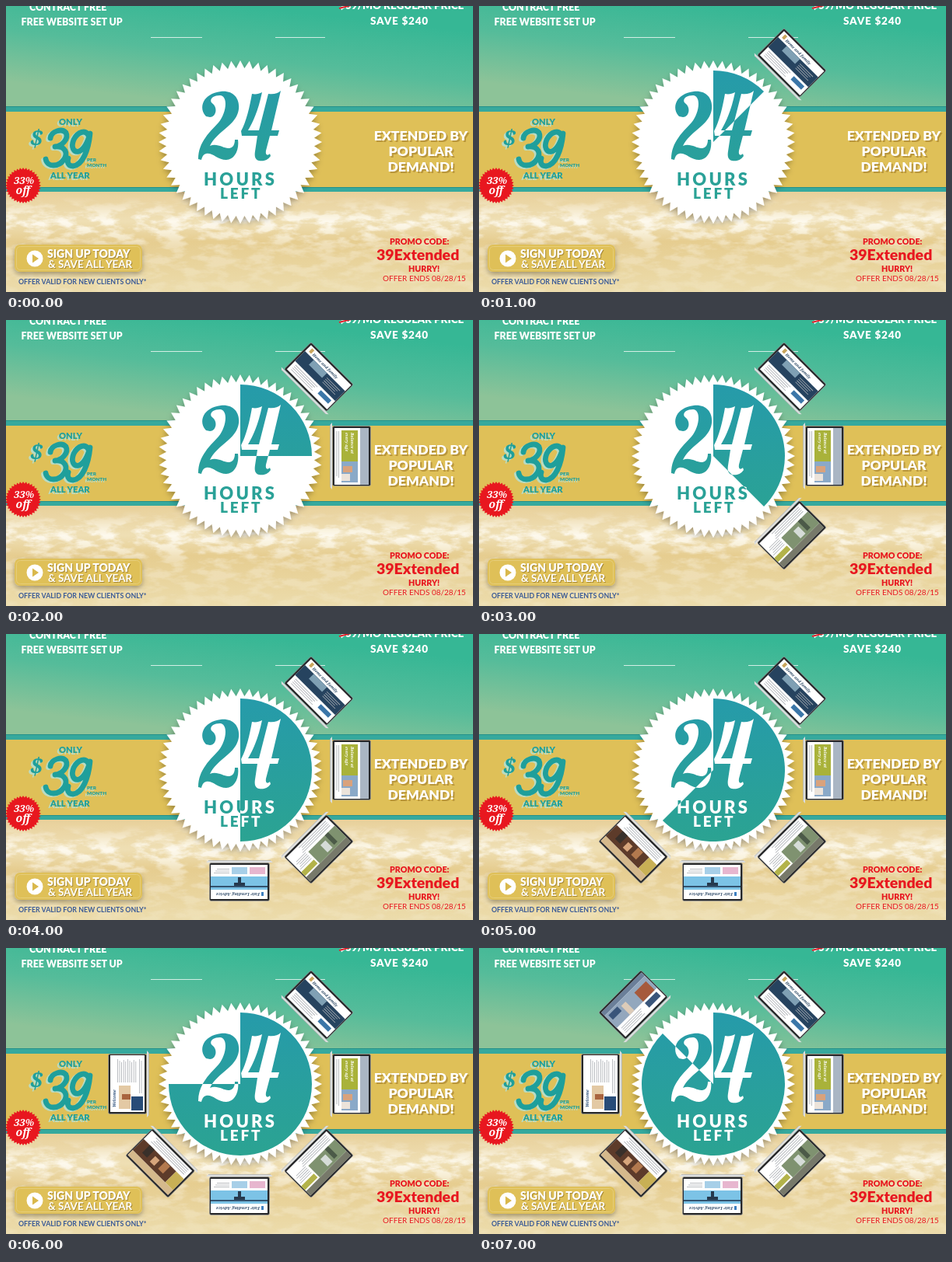
Write an HTML page that moves like this. It is 600 px wide and 368 px high and loops after 8 s.

```html
<!DOCTYPE html>
<html lang="en">
<head>
<meta charset="utf-8">
<title>24 hours left</title>
<style>
html, body { margin: 0; width: 100%; height: 100%; overflow: hidden; }
svg { display: block; width: 600px; height: 368px; }
text { font-family: Lato, "Open Sans", sans-serif; font-weight: 900; stroke: none; }
.bold { font-weight: 700; }
.plain { font-weight: 400; }
.script { font-family: "Noto Serif", serif; font-style: italic; font-weight: 700; }
.mid { text-anchor: middle; }
.strokes path { fill: none; stroke-width: 6.8; stroke-linecap: round; stroke-linejoin: round; }
</style>
</head>
<body>
<svg viewBox="0 0 600 368">
  <defs>
    <linearGradient id="sea" gradientUnits="userSpaceOnUse" x1="308" y1="0" x2="293" y2="131">
      <stop stop-color="#36b795"/><stop offset=".5" stop-color="#55bc9a"/><stop offset="1" stop-color="#8dc398"/>
    </linearGradient>
    <linearGradient id="sand" x2="0" y2="1">
      <stop stop-color="#e8d09a"/><stop offset=".3" stop-color="#efdfb4"/>
      <stop offset=".5" stop-color="#e6cd90"/><stop offset="1" stop-color="#ecdcac"/>
    </linearGradient>
    <linearGradient id="teal" gradientUnits="userSpaceOnUse" x1="0" y1="90" x2="0" y2="265">
      <stop stop-color="#269ba9"/><stop offset="1" stop-color="#2ba392"/>
    </linearGradient>
    <linearGradient id="fade" x2="0" y2="1">
      <stop offset=".05" stop-color="#000"/><stop offset=".3" stop-color="#ddd"/>
      <stop offset=".55" stop-color="#555"/><stop offset="1" stop-color="#222"/>
    </linearGradient>
    <mask id="shore"><rect y="239" width="600" height="129" fill="url(#fade)"/></mask>
    <filter id="foam" x="0" y="0" width="1" height="1">
      <feTurbulence type="fractalNoise" baseFrequency=".035 .09" numOctaves="5" seed="8"/>
      <feColorMatrix values="0 0 0 0 1  0 0 0 0 .98  0 0 0 0 .92  4 0 0 0 -1.6"/>
    </filter>
    <filter id="shadow" x="-20%" y="-20%" width="140%" height="140%">
      <feDropShadow dx="0" dy="3" stdDeviation="3" flood-opacity=".3"/>
    </filter>
    <clipPath id="wedge"><path id="slice"/></clipPath>

    <g id="label">
      <path d="M257 142C247 132 252 113 276 110C297 108 303 126 297 140C291 155 270 163 262 180C272 176 280 184 287 183C292 182 294 178 294 172L298 172C300 186 293 198 283 198C272 198 265 188 257 190C253 191 252 195 251 198L247 197C247 175 262 162 273 150C283 138 286 116 275 115C264 115 260 122 266 126C272 131 270 143 262 143Z"/>
      <path d="M329 111C324 135 317 150 311 160L325 160L337 113C343 114 349 113 353 109L341 160L351 160L349 167L339 167L334 186C333 192 336 193 339 190L340 193C336 199 330 200 325 199C320 198 319 193 320 187L323 167L303 167L302 161C309 148 313 130 316 113C321 114 325 113 329 111Z"/>
      <text x="254" y="230.500" font-size="22" letter-spacing="3.200">HOURS</text>
      <text x="275" y="248" font-size="19" letter-spacing="2.800">LEFT</text>
    </g>
    <g id="price" class="strokes">
      <path d="M57 170C58 161 72 157 77 163C81 171 72 180 63 181C77 180 80 190 74 198C68 207 53 208 51 197"/>
      <path d="M106 167C103 158 92 162 87 172C83 182 87 189 94 187C101 184 105 175 108 164C106 186 98 205 86 206C80 206 78 201 80 196"/>
      <text class="script" x="31" y="180" font-size="29">$</text>
      <text x="68" y="153" font-size="11.2">ONLY</text>
      <text x="57" y="222" font-size="11.2">ALL YEAR</text>
      <text x="104" y="200" font-size="6.4">PER</text>
      <text x="104" y="207" font-size="6.4">MONTH</text>
    </g>
    <g id="extended" class="mid" font-size="17.6">
      <text x="533" y="173">EXTENDED BY</text>
      <text x="533" y="193">POPULAR</text>
      <text x="533" y="213">DEMAND!</text>
    </g>
    <g id="signup">
      <text x="53" y="324" font-size="14">SIGN UP TODAY</text>
      <text class="bold" x="54" y="337" font-size="13.4">&amp; SAVE ALL YEAR</text>
    </g>
  </defs>

  <rect width="600" height="131" fill="url(#sea)"/>
  <rect y="238" width="600" height="130" fill="url(#sand)"/>
  <g mask="url(#shore)"><rect y="239" width="600" height="129" filter="url(#foam)"/></g>
  <rect y="129" width="600" height="110" fill="#36a99d"/>
  <path d="M0 129.500H600M0 233.500H600" stroke="#24918a"/>
  <rect y="136" width="600" height="97" fill="#dfc058"/>
  <path d="M186 40.500H252M346 40.500H410" stroke="#fff" stroke-opacity=".75"/>

  <g fill="#fff" font-size="12.4">
    <text x="30" y="6">CONTRACT FREE</text>
    <text x="19.500" y="25">FREE WEBSITE SET UP</text>
    <text x="428" y="4" font-size="13.5">$39/MO REGULAR PRICE</text>
    <text x="468" y="24" font-size="13.5" letter-spacing=".8">SAVE $240</text>
  </g>
  <path d="M428 3L452 -3" stroke="#e0202c" stroke-width="2"/>

  <use href="#price" x="-2.500" y="1.500" fill="#b9dcc4" stroke="#b9dcc4"/>
  <use href="#price" fill="#1f9f9b" stroke="#1f9f9b"/>
  <path id="badge" fill="#e8171f"/>
  <g fill="#fff" class="mid">
    <text class="script" x="23" y="229" font-size="13">33%</text>
    <text class="script" x="22" y="242" font-size="14">off</text>
  </g>

  <use href="#extended" x="2" y="2" fill="#b9963c"/>
  <use href="#extended" fill="#fff"/>

  <rect x="11" y="307" width="164" height="35" rx="7" fill="#dfc058" filter="url(#shadow)"/>
  <rect x="13.500" y="309.500" width="159" height="30" rx="5" fill="none" stroke="#e6cd78"/>
  <circle cx="37" cy="325" r="10.500" fill="#fff"/>
  <path d="M34 319.500L42 325L34 330.500Z" fill="#d9b84c"/>
  <use href="#signup" x="1" y="1" fill="#a88a37"/>
  <use href="#signup" fill="#fff"/>
  <text class="bold" x="16" y="358" font-size="8.8" fill="#3a5a96">OFFER VALID FOR NEW CLIENTS ONLY*</text>
  <g fill="#e8171f">
    <text x="493" y="307" font-size="10.7">PROMO CODE:</text>
    <text x="476" y="327" font-size="19.5">39Extended</text>
    <text x="517" y="342" font-size="10.7">HURRY!</text>
    <text class="plain" x="484" y="354" font-size="10">OFFER ENDS 08/28/15</text>
  </g>

  <path id="star" fill="#fff" filter="url(#shadow)"/>
  <use href="#label" fill="url(#teal)"/>
  <g clip-path="url(#wedge)">
    <rect x="200" y="80" width="200" height="190" fill="url(#teal)"/>
    <use href="#label" fill="#fff"/>
  </g>
  <g id="laptops"></g>
</svg>
<script>
const $ = id => document.getElementById(id);
const CX = 301, CY = 175, STEP = 1000;

const polar = (cx, cy, r, deg) => {
  const a = (deg - 90) * Math.PI / 180;
  return `${(cx + r * Math.cos(a)).toFixed(2)} ${(cy + r * Math.sin(a)).toFixed(2)}`;
};

function starPath(cx, cy, outer, inner, teeth) {
  const points = [];
  for (let i = 0; i < teeth * 2; i++) points.push(polar(cx, cy, i % 2 ? inner : outer, i * 180 / teeth));
  return `M${points.join("L")}Z`;
}

const rect = (fill, x, y, w, h) => `<rect x="${x}" y="${y}" width="${w}" height="${h}" fill="${fill}"/>`;
const lines = (x, y, w, count) => Array.from({ length: count }, (_, i) =>
  rect("#a9adb2", x, y + i * 2.6, w - i * 7 % 5, .8)).join("");
const words = (fill, x, y, size, text) =>
  `<text x="${x}" y="${y}" font-size="${size}" fill="${fill}" class="script">${text}</text>`;

// Page content, drawn upright with the middle of the screen at 0,0
const pages = [
  rect("#c9a55c", -32, -21, 4, 6) + words("#26435f", -26, -15, 5, "Home and family") +
    rect("#26435f", -36, -12, 73, 18) + rect("#7fa0b4", -20, -12, 24, 9) + lines(8, -8, 24, 4) +
    lines(-32, 9, 40, 4) + rect("#3b76a8", 14, 9, 19, 6),
  rect("#aab6c4", -36, -23, 73, 11) + rect("#a9b23a", -33, -9, 40, 21) + rect("#8aa9c8", 7, -9, 27, 21) +
    rect("#d9a27c", 13, -2, 8, 12) + rect("#ece3da", 23, 1, 9, 11) + words("#fff", -30, 0, 5, "Balance at") +
    words("#fff", -30, 7, 5, "every age") + lines(-32, 15, 60, 2),
  rect("#77796a", -36, -23, 73, 8) + rect("#7f9270", -36, -15, 48, 21) + rect("#4c5a48", -24, -11, 6, 17) +
    rect("#d6dcd8", -14, -12, 9, 13) + rect("#b3b34a", 14, -13, 23, 7) + lines(15, -3, 20, 5) + lines(-32, 10, 50, 4),
  rect("#3d7fc0", -31, -19, 3, 5) + words("#35506e", -26, -15, 5.5, "Fair Lending Advice") + rect("#7cc3e6", -36, -11, 73, 17) +
    rect("#33536f", -36, -8, 73, 2) + rect("#26394d", -7, -6, 14, 4) + rect("#26394d", -2, -2, 4, 7) +
    rect("#e7b6cf", -33, 9, 20, 9) + rect("#a7cfe8", -10, 9, 20, 9) + lines(13, 10, 20, 3),
  rect("#d5b98c", -36, -23, 73, 9) + rect("#5d3b2a", -22, -14, 59, 20) + rect("#b3794e", -12, -8, 9, 13) +
    rect("#d6a57c", 3, -9, 8, 10) + rect("#39302a", 17, -8, 9, 14) + rect("#c8b055", -36, -14, 14, 20) + lines(-32, 10, 60, 4),
  words("#284c78", -30, -16, 5, "Welcome") + lines(2, -14, 30, 10) + rect("#e3c9a4", -32, -12, 30, 15) +
    rect("#a9643f", -20, -8, 7, 11) + rect("#284c78", -34, 4, 18, 15) + lines(-12, 14, 44, 2),
  rect("#6b7f99", -36, -23, 73, 6) + rect("#93a7bd", -36, -17, 73, 22) + rect("#dccbb8", -12, -11, 8, 16) +
    rect("#a65a3c", 12, -11, 21, 16) + rect("#39557a", -32, -14, 16, 8) + lines(-32, 9, 36, 4) + rect("#39557a", 12, 8, 21, 8)
];

$("laptops").innerHTML = pages.map((page, i) => `
  <g transform="translate(300 ${CY}) rotate(${(i + 1) * 45}) translate(0 -143)">
    <rect x="-38.5" y="-25.5" width="77" height="49" rx="2" fill="#262729" stroke="#a9acae" stroke-width=".6"/>
    ${rect("#fff", -36, -23, 73, 44)}${page}
    <path d="M-43 24H43L40 26.5H-40Z" fill="#dcdedf"/>
    <path d="M-40 26.5H40" stroke="#a3a6a8" stroke-width=".6"/>
  </g>`).join("");

$("star").setAttribute("d", starPath(CX, CY, 105, 95, 56));
$("badge").setAttribute("d", starPath(22, 231, 23, 20.5, 36));

function draw(now) {
  const count = Math.floor(now / STEP) % 8;
  const angle = count * 45;
  $("slice").setAttribute("d", count
    ? `M${CX} ${CY}L${polar(CX, CY, 92, 0)}A92 92 0 ${angle > 180 ? 1 : 0} 1 ${polar(CX, CY, 92, angle)}Z`
    : "M0 0");
  [...$("laptops").children].forEach((laptop, i) => laptop.style.display = i < count ? "" : "none");
}

const start = performance.now();
function tick() {
  draw(performance.now() - start);
  requestAnimationFrame(tick);
}
tick();
</script>
</body>
</html>
```
